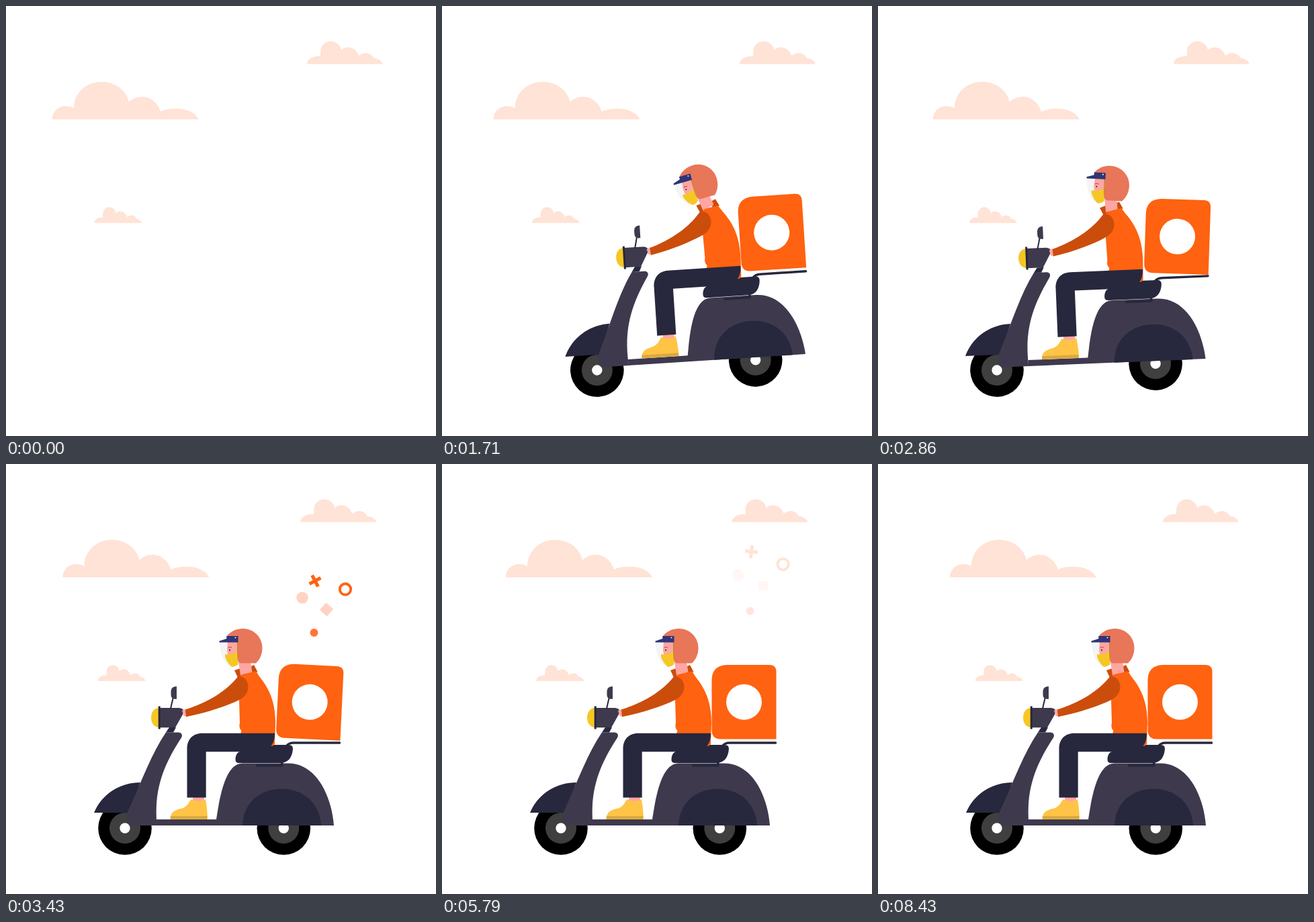
An HTML page that plays this animation: 640 by 640 pixels, repeating every 8.5 s.

```html
<!DOCTYPE html>
<html lang="en">
<head>
<meta charset="utf-8">
<title>Scooter delivery</title>
<style>
  html, body { margin: 0; height: 100%; overflow: hidden; background: #fff; }
  svg { display: block; width: 100vw; height: 100vh; }
  .cloud { fill: #ffe3d6; }
  .orange { fill: #ff6210; }
  .rust { fill: #cb4d0c; }
  .plum { fill: #3f394e; }
  .navy { fill: #27283d; }
  .skin { fill: #ffa6a3; }
  .yellow { fill: #f6c723; }
  .white { fill: #fff; }
  .line { fill: none; stroke: #27283d; stroke-linecap: round; }
</style>
</head>
<body>
<svg viewBox="0 0 640 640">
  <defs>
    <path id="puff" d="M0 0C0-7.5 8-12 20-12V-18.5C20-27.5 27-34 35.5-34C43-34 50-28.5 51-21Q55-25 61-25C69-25 75-19.5 77-12.5Q82-16.5 87.5-16.5Q96-16.5 99.5-9Q109-8.5 113 0Z"/>
    <g id="wheel">
      <circle r="39.8"/>
      <circle r="23" fill="#3f3f3f"/>
      <circle r="7.7" class="white"/>
    </g>
  </defs>

  <g class="cloud">
    <path id="cloudLeft" d="M69 168.8C69 157 78 149 89 149Q96 149 101 152C101 130 119 112.8 142 112.8C162 112.8 179 125 183 143Q191 135 203 135C215 135 226 144 230 157Q239 152.8 253 152.8C270 152.8 282 159 287 168.8Z"/>
    <g id="cloudRight"><use href="#puff" transform="translate(448 86.6)"/></g>
    <g id="cloudSmall"><use href="#puff" transform="translate(131.5 323) scale(.628 .7)"/></g>
  </g>

  <g id="scooter">
    <use href="#wheel" x="177" y="542"/>
    <use href="#wheel" x="413.3" y="542"/>
    <path class="line" stroke-width="3.5" d="M417 420Q421 415 428 415H496.5"/>
    <g id="box">
      <path class="orange" d="M424 299H487Q497.5 299 497.5 309.5V409.5H415Q401.5 409.5 401.5 396V321Q402 300 424 299Z"/>
      <circle class="white" cx="449.5" cy="354.3" r="26.5"/>
    </g>

    <path class="navy" d="M131 519C141 494 167 474 200 474L184 519Z"/>
    <path class="plum" d="M238 399.5H257Q262 400 262 404.5Q261.5 407 258 412C234 450 220 485 224.5 538H186Q178 537 179.5 521C200 478 215 433 238 399.5Z"/>
    <path class="plum" d="M224 529H313C318 497 326 445.5 352 445.5H420C460 445.5 484 490 488 538H224Z"/>
    <path class="navy" d="M352 538C353 504 378 483.5 410 483.5S467 504 469 538Z"/>
    <path class="navy" d="M353 427C370 428 380 418 400 418H421Q427 418 427 424C426 437 420 445 408 445H347Q341 445 341.5 439C342 431 346 427 353 427Z"/>
    <path class="navy" d="M372 446.8H409V444H412.5V450.4H372Z"/>

    <path class="yellow" d="M228 363C220 363 216 370 216 377.5S220 392 228 392Z"/>
    <path class="navy" d="M243 392H253L249 399.5H238Z"/>
    <path class="plum" d="M228 363H258Q266 364 264 371L252 392.3H228Z"/>
    <path class="navy" d="M226.7 360.5h3v34h-3z"/>
    <path class="line" stroke-width="2" d="M245 364L248.7 348"/>
    <path class="plum" d="M254 331V349.7H250.5Q245.5 349 245.5 343.5V338Q246 331 254 331Z"/>

    <path class="skin" d="M278 495H295V505H278Z"/>
    <path fill="#ffc446" d="M244.5 528.7C245 516 253 515 262 512.5C270 510 272 504 275.5 499Q286 505 297 499C299 510 300 520 299.7 528.7Z"/>
    <path fill="#dba940" d="M245 524H299.6V528.8H244.5Z"/>

    <path class="rust" d="M340 307L349 304 354 318 346 320ZM363 302L369 299 374.5 309.5 364 312Z"/>
    <g id="head">
      <path class="skin" d="M346 294H364L366.5 310 349 314.5Z"/>
      <path fill="#f4f4f5" d="M318 265H331L329 284 333 301Q318 290 318 265Z"/>
      <path class="skin" d="M330 264H346V286H330L329 276Z"/>
      <path class="yellow" d="M326 283Q335 285 345.5 279V298Q341 302 336 302Q329 296 326 287Z"/>
      <path fill="#e87659" d="M328 257.5C333 249.5 343 245 352.5 245C369 245 381.5 258 381.5 274C381.5 283 378 291 372 296.5H350Q345 296 345 290V262Z"/>
      <path fill="#b78d23" d="M343.8 265H345.2V293Q344 290 343.8 265Z"/>
      <path fill="#303577" d="M317.5 263.5L328.3 260V256H345.5V265.6H317.5Z"/>
      <circle class="white" cx="341.5" cy="258.6" r="1"/>
      <path fill="none" stroke="#b3403f" d="M330.5 273.5Q333 271.5 336 273.3"/>
      <circle cx="333" cy="277" r=".9"/>
    </g>
    <path class="orange" d="M346 318L352 313 372.5 308.5C377 320 401 336 401 385L400 417 396 420 349 402 350.5 397Q346 393 348 385Q347 350 346 318Z"/>
    <path class="skin" d="M262 367L268 364.5 270 376 264.5 375Z"/>
    <path class="rust" d="M267 365.5C300 355 327 339 345 316.5C354 315 361 323 360.5 333C359 346 350 350 340 354.5C315 365 290 372 268 376.2Z"/>
    <path class="navy" d="M400 400.8H292C278 400.8 269.5 410 269.5 424V496.5H297.7V428.3H375C390 427 400 420 400 400.8Z"/>
  </g>

  <g id="confetti">
    <path class="orange" d="M-9.5-2.5H-2.5V-9.5H2.5V-2.5H9.5V2.5H2.5V9.5H-2.5V2.5H-9.5Z"/>
    <circle r="8.2" fill="none" stroke="#ff6210" stroke-width="3.8"/>
    <circle r="8.7" fill="#ffd3c1"/>
    <path fill="#ffd3c1" d="M-7.2-7.2H7.2V7.2H-7.2Z"/>
    <circle r="6" fill="#ff7637"/>
  </g>
</svg>

<script>
const LOOP = 8500;
const $ = id => document.getElementById(id);
const set = (node, transform) => node.setAttribute('transform', transform);
const clamp = v => Math.min(1, Math.max(0, v));

// Eased value through [time, value] keys.
function track(t, keys) {
  let value = keys[0][1];
  for (let i = 1; i < keys.length; i++) {
    const [t0, v0] = keys[i - 1], [t1, v1] = keys[i];
    const u = clamp((t - t0) / (t1 - t0));
    if (u > 0) value = v0 + (v1 - v0) * u * u * (3 - 2 * u);
  }
  return value;
}

const tiltKeys = [[1240, 0], [1950, -5], [2370, -5], [3320, 0]];
const headKeys = [[1200, -50], [2100, 13], [2340, 13], [3300, 0]];
const boxKeys = [[2200, 0], [2850, 4.3], [4300, 0]];

// Final x, y; drift back in x, y; final angle and turn.
const pieces = [
  [460.5, 129.5, -0.5, 44.5, 7, -35],
  [507.7, 148.5, -2.7, 38, 0, 0],
  [440.4, 164.5, 0.6, 34.5, 0, 0],
  [478, 180.7, -1, 35.8, 0, 42],
  [458.5, 218, 0, 33, 0, 0]
];

function draw(t) {
  set($('cloudLeft'), `translate(${t * .00451})`);
  set($('cloudRight'), `translate(${t * -.00284})`);
  set($('cloudSmall'), `translate(${t * .00157})`);

  const distance = (Math.max(0, 2455 - t) * .00662) ** 2.5;
  set($('scooter'), `translate(${distance}) rotate(${track(t, tiltKeys)} 177 542)`);
  $('scooter').style.display = t < 650 ? 'none' : '';
  set($('head'), `rotate(${track(t, headKeys)} 354 311)`);
  set($('box'), `rotate(${track(t, boxKeys)} 450 409)`);

  const back = (Math.max(0, 6200 - t) / 2770) ** 2;
  const opacity = Math.min(clamp((t - 3220) / 180), clamp((6100 - t) / 1700));
  pieces.forEach(([x, y, dx, dy, angle, turn], i) => {
    const node = $('confetti').children[i];
    set(node, `translate(${x + dx * back} ${y + dy * back}) rotate(${angle + turn * back})`);
    node.style.opacity = opacity;
  });
}

const start = performance.now();
function tick() {
  draw((performance.now() - start) % LOOP);
  requestAnimationFrame(tick);
}
tick();
</script>
</body>
</html>
```
